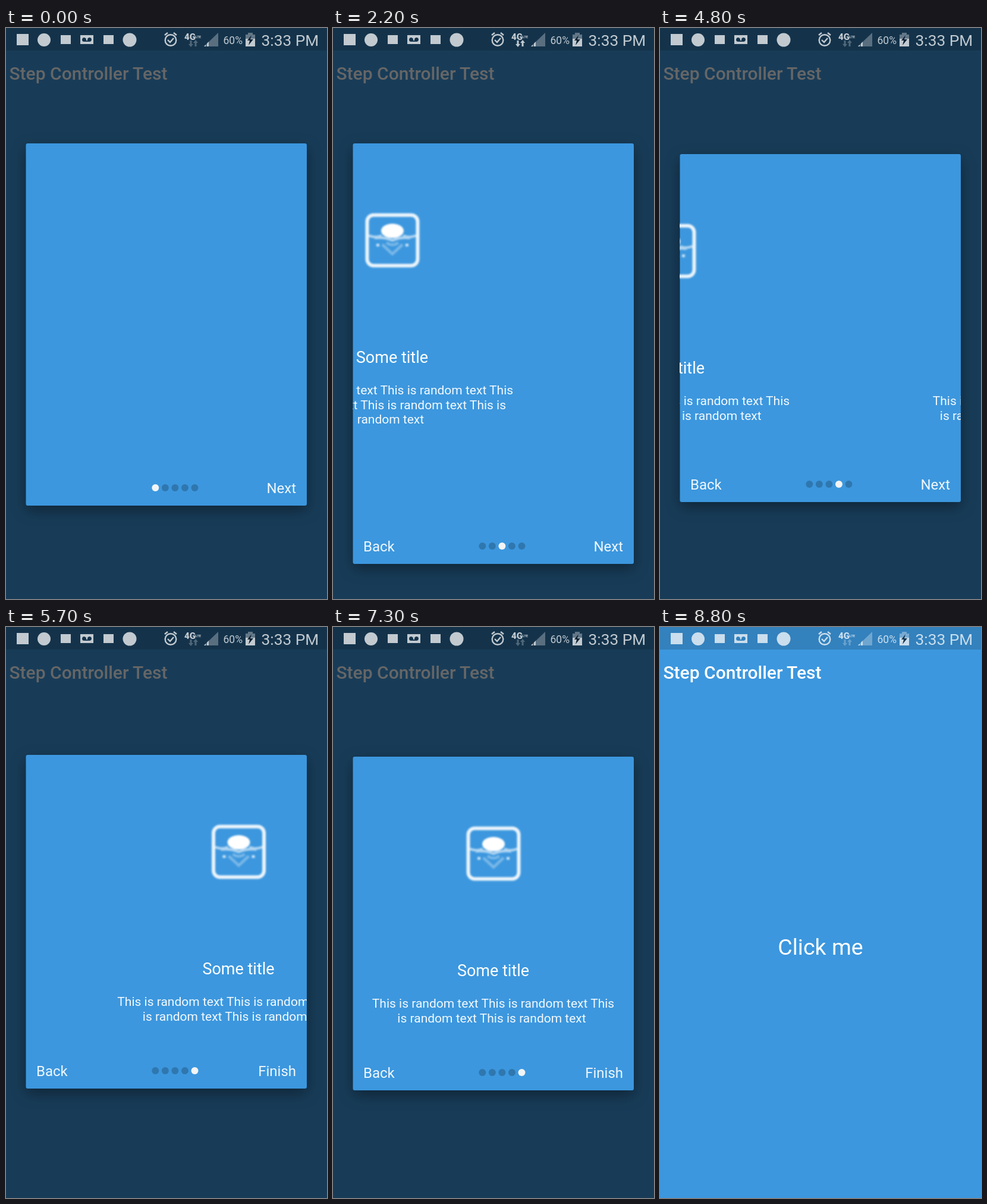
Recreate the animation shown at these times as an HTML page. Size 540 by 960 pixels, loop 8900 ms.

```html
<!DOCTYPE html>
<html lang="en">
<head>
<meta charset="utf-8">
<title>Step dialog</title>
<style>
html, body { margin: 0; width: 100%; height: 100%; overflow: hidden; background: #3c97de; }
svg { display: block; font-family: Roboto, sans-serif; fill: #fff; }
#shadow { fill: #3c97de; filter: drop-shadow(0 8px 12px rgba(0, 0, 0, .38)); }
.mid { text-anchor: middle; }
.line { fill: none; stroke: #fff; }
</style>
</head>
<body>
<svg width="540" height="960" viewBox="0 0 540 960">
  <defs>
    <filter id="soft" x="-20%" y="-20%" width="140%" height="140%"><feGaussianBlur stdDeviation="1.7"/></filter>
    <g id="picture" filter="url(#soft)">
      <rect class="line" x="-42.5" y="-42.5" width="85" height="85" rx="11" stroke-width="6" opacity=".9"/>
      <ellipse cy="-16" rx="19" ry="12"/>
      <g class="line" stroke-width="4.5">
        <path d="M-40 -8Q-26 -3 -18 -8M40 -8Q26 -3 18 -8M-30 -4Q-14 -6 0 0Q14 -6 30 -4" opacity=".6"/>
        <path d="M-27 8h5M22 8h5" opacity=".75"/>
        <path d="M-17 7L0 23L17 7M-10 4Q0 11 10 4" opacity=".32"/>
      </g>
    </g>
  </defs>

  <rect width="540" height="960" fill="#3c97de"/>
  <text x="5.500" y="87" font-size="30" font-weight="500">Step Controller Test</text>
  <text class="mid" x="270" y="551" font-size="37.5">Click me</text>
  <rect id="dim" width="540" height="960" fill="#000"/>

  <g id="dialog">
    <rect id="shadow" x="33.5" width="472.5" rx="3"/>
    <svg id="card" x="33" width="473">
      <g id="pages"></g>
      <g id="footer">
        <text id="back" x="18" y="-21" font-size="24" opacity=".92">Back</text>
        <text id="next" x="455" y="-21" font-size="24" text-anchor="end" opacity=".92"></text>
        <g id="dots"></g>
      </g>
    </svg>
  </g>

  <rect width="540" height="38" opacity=".15" fill="#000"/>
  <g opacity=".74">
    <rect x="18" y="10" width="20" height="19"/>
    <circle cx="64" cy="20" r="11"/>
    <rect x="92" y="12" width="17" height="15"/>
    <path fill-rule="evenodd" d="M125 12h22v15h-22zM128 19.5a3.5 3.5 0 0 0 3.5 3.5h9a3.5 3.5 0 1 0 -3.2 -2h-2.6a3.5 3.5 0 1 0 -6.7 -1.5z"/>
    <rect x="164" y="12" width="17" height="15"/>
    <circle cx="208" cy="20" r="11.5"/>
    <g class="line" stroke-width="2.4">
      <circle cx="277" cy="20.5" r="9.3"/>
      <path d="M267 12l5 -4M287 12l-5 -4M272 20l4 4l6 -7"/>
    </g>
    <text x="300" y="19.5" font-size="15" font-weight="900">4G</text>
    <text x="318.500" y="17" font-size="6" font-weight="700">LTE</text>
    <path id="arrows" d="M311 32l-4 -5h2.5v-6h3v6h2.5zM319 20l4 5h-2.5v6h-3v-6h-2.5z"/>
    <path d="M357 8V31H333z" opacity=".4"/>
    <path d="M333 31l3 -3v3zM338 31v-5l3 -3v8z"/>
    <text x="365.5" y="26.5" font-size="17.5">60%</text>
    <path d="M407 8h8v3h4v7h-16v-7h4z" opacity=".45"/>
    <path d="M403 18h16v13h-16z"/>
    <path d="M413 12l-7 9h4l-2 8l8 -10h-5z" fill="#0b1d2b"/>
    <text x="429.500" y="30" font-size="26.3">3:33 PM</text>
  </g>
</svg>

<script>
const $ = id => document.getElementById(id);
const LOOP = 8900, FRAME = 100, SLIDE = 365, PITCH = 648;
const CENTER = 236.5, MIDDLE = 498.75, LEADING = 24.5;
const CLOSE = 8300, FADE = 500;

// lag: wait before the slide; lines: text height while the layout is measured again
const steps = [
  { at: 0, page: 0, lag: 0 },
  { at: 900, page: 1, lag: 300 },
  { at: 2000, page: 2, lag: 22, lines: 8 },
  { at: 2900, page: 1, lag: 300, lines: 8 },
  { at: 3800, page: 2, lag: 64 },
  { at: 4600, page: 3, lag: 64 },
  { at: 5600, page: 4, lag: 64 },
  { at: 6400, page: 3, lag: 200, lines: 8 },
  { at: 7300, page: 4, lag: 64, lines: 6 }
];

const texts = [7, 8, 5, 4, 6].map(n =>
  "This is random text ".repeat(n).trim().match(/\S.{0,44}(?= |$)/g));

$("pages").innerHTML = texts.map(lines => {
  const body = lines.map((line, i) => {
    const x = CENTER - (i == lines.length - 1 ? 2.5 : 0);
    return `<text class="mid" x="${x}" y="${422 + LEADING * i}" font-size="21" opacity=".94">${line}</text>`;
  });
  return `<g><use href="#picture" x="237" y="163"/>
    <text class="mid" x="${CENTER}" y="369" font-size="27">Some title</text>${body.join("")}</g>`;
}).join("");
$("dots").innerHTML = texts.map((_, i) => `<circle cx="${218.3 + 16.55 * i}" cy="-30" r="6"/>`).join("");
const pages = [...$("pages").children], dots = [...$("dots").children];

const clamp = k => Math.max(0, Math.min(1, k));
const mix = (a, b, k) => a + (b - a) * k;
const tall = lines => 512 + LEADING * lines;
const topOf = height => MIDDLE - height / 2;

// top and height of the card, dt after a press
function cardAt(dt, step, from) {
  const old = tall(texts[from].length), now = tall(texts[step.page].length);
  if (!step.lines) {
    const height = dt < step.lag + SLIDE ? old : now;
    return [mix(topOf(old), topOf(now), clamp(dt / 400)), height];
  }
  const back = step.page < from, wide = tall(step.lines);
  if (dt < 200) {
    const height = back && dt >= FRAME ? now : old;
    return [topOf(height), height];
  }
  if (dt <= 300) return [back ? topOf(wide) : mix(topOf(old), topOf(wide), (dt - 200) / 100), wide];
  const rest = 1 - clamp((dt - 300) / 300);
  return [mix(topOf(now), topOf(wide), rest ** 3), now];
}

// page number -> horizontal offset, for the pages in view
function offsetsAt(dt, { page, lag }, from) {
  if (dt < lag) return { [page < from && dt >= FRAME ? page : from]: 0 };
  const rest = 1 - clamp((dt - lag) / SLIDE);
  const x = -PITCH * rest ** 2;
  return rest ? { [from]: x + PITCH, [page]: x } : { [page]: 0 };
}

function draw(t) {
  const n = steps.filter(s => s.at <= t).length - 1;
  const step = steps[n], { page } = step;
  const from = n ? steps[n - 1].page : 0, dt = t - step.at;

  const shown = offsetsAt(dt, step, from);
  pages.forEach((p, i) => {
    p.setAttribute("display", i in shown ? "inline" : "none");
    p.setAttribute("transform", `translate(${shown[i] || 0} 0)`);
  });

  const [y, h] = cardAt(dt, step, from);
  const top = Math.round(y), height = Math.floor(y + h) - top;
  for (const id of ["shadow", "card"]) {
    $(id).setAttribute("y", top);
    $(id).setAttribute("height", height);
  }
  $("footer").setAttribute("transform", `translate(0 ${height})`);
  $("back").setAttribute("display", page ? "inline" : "none");
  $("next").textContent = page == texts.length - 1 ? "Finish" : "Next";
  dots.forEach((d, i) => {
    d.setAttribute("fill", i == page ? "#f2f4f5" : "#000");
    d.setAttribute("opacity", i == page ? 1 : .21);
  });

  const alpha = (1 - clamp((t - CLOSE) / FADE)) ** 2;
  $("dialog").setAttribute("opacity", alpha);
  $("dim").setAttribute("opacity", .6 * alpha);
  $("arrows").setAttribute("opacity", step.lines && dt >= 100 && dt < 300 ? 1 : .35);
}

const begin = performance.now();
function tick() {
  const t = (performance.now() - begin) % LOOP;
  draw(Math.floor(t / FRAME) * FRAME);
  requestAnimationFrame(tick);
}
tick();
</script>
</body>
</html>
```
